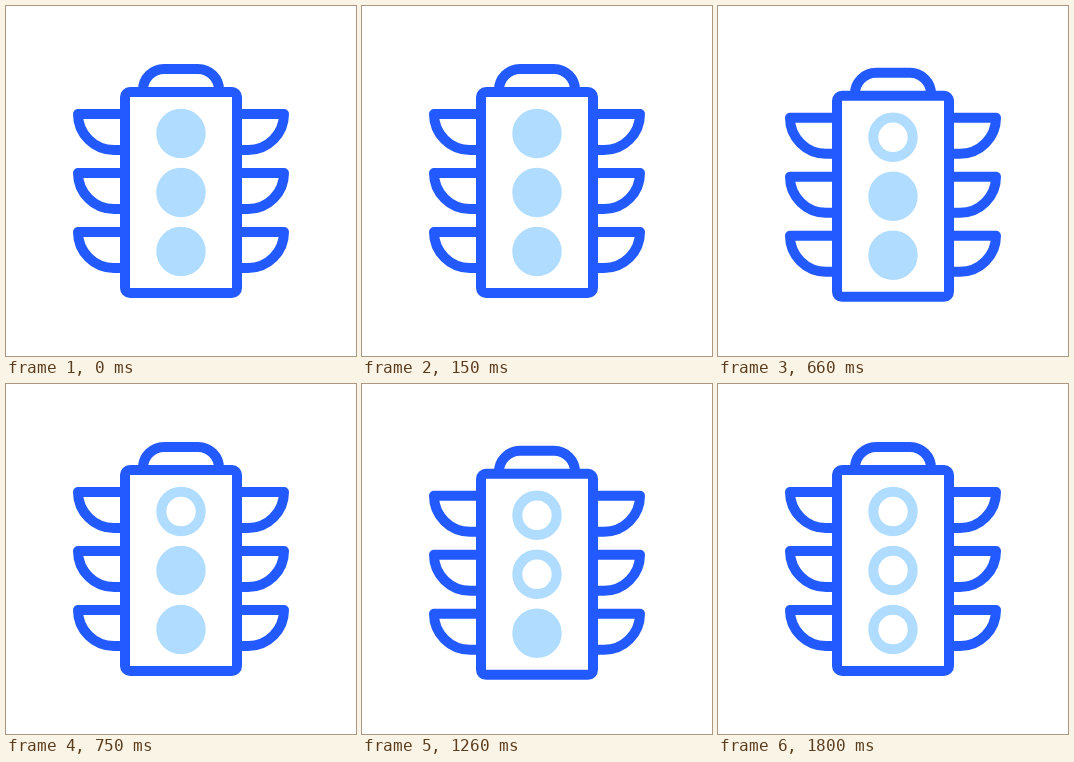
These frames come from a looping animation (350 px wide and 350 px high, 1910 ms). An HTML page:

```html
<!DOCTYPE html>
<html lang="en">
<head>
<meta charset="utf-8">
<title>Traffic light</title>
<style>
  html, body { margin: 0; width: 100%; height: 100%; overflow: hidden; background: #fff; }
  svg { display: block; width: 100%; height: 100%; }
</style>
</head>
<body>
<svg viewBox="0 0 350 350">
  <defs>
    <path id="fin" d="M119 108H72A36 36 0 0 0 108 144H119"/>
    <g id="fins">
      <use href="#fin"/>
      <use href="#fin" y="59"/>
      <use href="#fin" y="118"/>
    </g>
  </defs>
  <g id="lamp" fill="none" stroke="#235aff" stroke-width="10" stroke-linejoin="round">
    <use href="#fins"/>
    <use href="#fins" transform="matrix(-1 0 0 1 350 0)"/>
    <path d="M137 86V84A21 21 0 0 1 158 63H192A21 21 0 0 1 213 84V86"/>
    <rect x="119" y="86" width="112" height="201" rx="5" fill="#fff"/>
    <g id="lights" stroke="#afdcff">
      <circle cx="175" cy="127.5" r="19.7"/>
      <circle cx="175" cy="186.5" r="19.7"/>
      <circle cx="175" cy="245.5" r="19.7"/>
    </g>
  </g>
</svg>
<script>
  const LOOP = 1910, BEAT = 600, DIP = 150, STEP = 30, DEPTH = 4;
  const lamp = document.getElementById('lamp');
  const lights = [...document.getElementById('lights').children];

  function draw(now) {
    const t = now % LOOP;
    const phase = Math.floor(t % BEAT / STEP) * STEP;
    // Each beat starts with a short dip of the whole lamp.
    const dip = t < 3 * BEAT && phase < DIP ? DEPTH * Math.sin(Math.PI * phase / DIP) : 0;
    lamp.setAttribute('transform', `translate(0 ${dip})`);
    lights.forEach((light, i) =>
      light.setAttribute('fill', t < BEAT * (i + 1) ? '#afdcff' : '#fff'));
  }

  const start = performance.now();
  function tick() {
    draw(performance.now() - start);
    requestAnimationFrame(tick);
  }
  tick();
</script>
</body>
</html>
```
